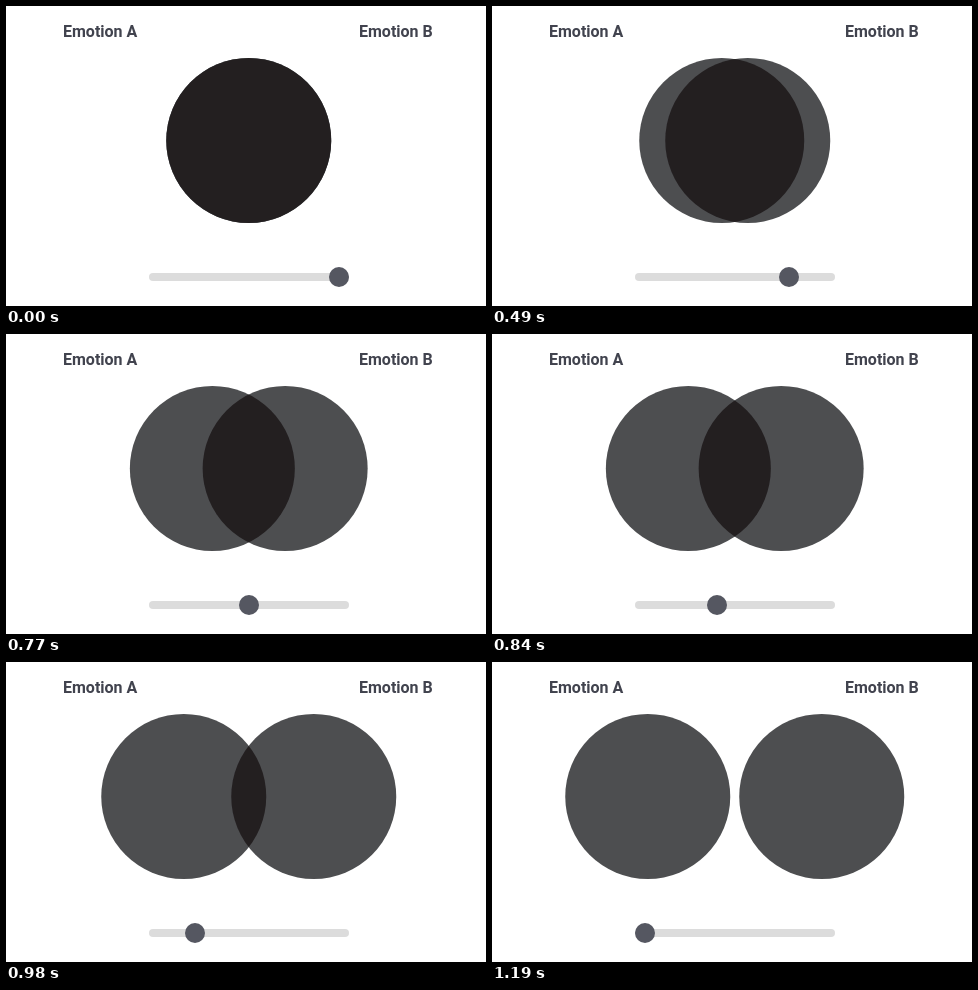
Recreate the animation shown at these times as an HTML page. Size 480 px wide and 300 px high, loop 2.03 s.

```html
<!DOCTYPE html>
<html lang="en">
<head>
<meta charset="utf-8">
<title>Emotion overlap slider</title>
<style>
  html, body { margin: 0; height: 100%; overflow: hidden; background: #fff; }
  svg { display: block; }
  text { font: 700 16px Roboto, sans-serif; fill: #41434e; }
</style>
</head>
<body>
<svg width="480" height="300" viewBox="0 0 480 300">
  <defs>
    <clipPath id="lens"><circle class="left" cy="134.5" r="82.5"/></clipPath>
  </defs>
  <text x="57" y="31">Emotion A</text>
  <text x="353" y="31">Emotion B</text>
  <g fill="#4d4e50">
    <circle class="left" cy="134.5" r="82.5"/>
    <circle class="right" cy="134.5" r="82.5"/>
  </g>
  <g clip-path="url(#lens)">
    <circle class="right" cy="134.5" r="82.5" fill="#231f20"/>
  </g>
  <rect x="143" y="267" width="200" height="8" rx="4" fill="#dcdcdc"/>
  <circle id="knob" cy="271" r="10" fill="#555761"/>
</svg>
<script>
  const LOOP = 2030, CENTER = 242.75;
  // Start time of each slider step, and how far the circles sit from the center
  const times = [0, 420, 490, 630, 700, 770, 840, 910, 980, 1050, 1190];
  const offsets = [0, 7, 13, 19.5, 28, 36.4, 46.4, 56.4, 65, 73.4, 87];
  const knob = document.getElementById("knob");

  function place(selector, x) {
    for (const el of document.querySelectorAll(selector)) el.setAttribute("cx", x);
  }

  function draw(now) {
    const t = now % LOOP;
    const step = times.filter(start => start <= t).length - 1;
    place(".left", CENTER - offsets[step]);
    place(".right", CENTER + offsets[step]);
    knob.setAttribute("cx", 333 - 18 * step);
  }

  const begin = performance.now();
  function frame() {
    draw(performance.now() - begin);
    requestAnimationFrame(frame);
  }
  frame();
</script>
</body>
</html>
```
